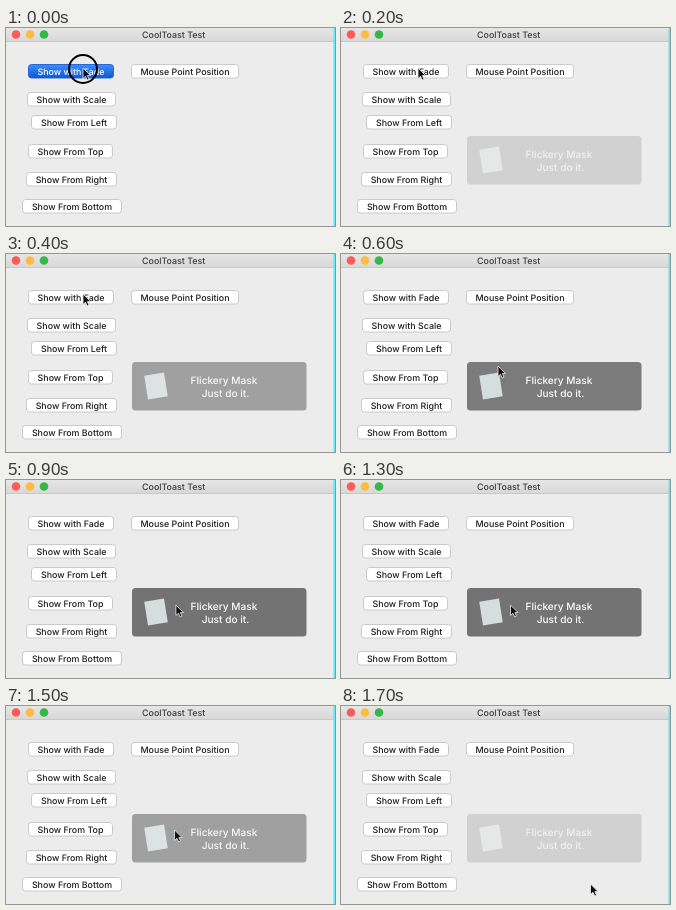
These frames come from a looping animation (329 px wide and 198 px high, 1800 ms). An HTML page:

```html
<!DOCTYPE html>
<html lang="en">
<head>
<meta charset="utf-8">
<title>CoolToast Test</title>
<style>
  html, body { margin: 0; width: 100%; height: 100%; overflow: hidden; background: #ececec; }
  svg { display: block; width: 329px; height: 198px; }
  text { font: 500 8.9px Inter, "Open Sans", sans-serif; text-anchor: middle; text-rendering: geometricPrecision; }
  #toast text { font-size: 10.1px; fill: #fff; }
</style>
</head>
<body>
<svg viewBox="0 0 329 198">
  <defs>
    <linearGradient id="bar" x2="0" y2="1">
      <stop stop-color="#e6e6e6"/><stop offset="1" stop-color="#d8d8d8"/>
    </linearGradient>
    <linearGradient id="blue" x2="0" y2="1">
      <stop stop-color="#3f8df6"/><stop offset="1" stop-color="#0b58dc"/>
    </linearGradient>
  </defs>
  <rect width="329" height="198" fill="#ececec"/>
  <rect width="329" height="13" fill="url(#bar)"/>
  <rect y="13" width="329" height="1" fill="#c8c8c8"/>
  <circle cx="10" cy="6.5" r="4.3" fill="#fc5b57"/>
  <circle cx="24" cy="6.5" r="4.3" fill="#fdbc40"/>
  <circle cx="38" cy="6.5" r="4.3" fill="#34b84a"/>
  <text x="167.7" y="9.9" fill="#3c3c3c">CoolToast Test</text>
  <g id="buttons"></g>
  <rect x="327.5" width="1.5" height="198" fill="#5ce8f4"/>
  <g id="toast">
    <rect x="126" y="108" width="174.5" height="48.5" rx="3.5" fill="#000" fill-opacity=".51"/>
    <rect x="140" y="120" width="20" height="24" fill="#d5dddd" transform="rotate(-9 150 132)"/>
    <text x="218" y="129.8">Flickery Mask</text>
    <text x="219.5" y="143">Just do it.</text>
  </g>
  <circle id="ring" cx="77" cy="41" r="14" fill="none" stroke="#000" stroke-width="2"/>
  <path id="cursor" d="M0 0V10.5L2.5 8.3L4.2 12L6 11.2L4.4 7.6H7.6Z" fill="#111" stroke="#eee" stroke-width=".8"/>
</svg>
<script>
const $ = id => document.getElementById(id);
const LOOP = 1800, STEP = 100;

// label, left, top, width
const buttons = [
  ["Show with Fade", 22, 36, 86],
  ["Mouse Point Position", 125, 36, 108],
  ["Show with Scale", 21, 64, 89],
  ["Show From Left", 25, 87, 86],
  ["Show From Top", 22, 116, 85],
  ["Show From Right", 20, 144, 91],
  ["Show From Bottom", 16, 171, 100],
];
$("buttons").innerHTML = buttons.map(([label, x, y, w]) => `
  <rect x="${x + .5}" y="${y + .5}" width="${w - 1}" height="13.5" rx="3" fill="#fff" stroke="#c6c6c6" stroke-width=".9"/>
  <text x="${x + w / 2}" y="${y + 10.5}" fill="#1c1c1c">${label}</text>`).join("");
const fadeFace = $("buttons").querySelector("rect");
const fadeLabel = $("buttons").querySelector("text");

// [time, value...] keys joined by straight lines
const opacityKeys = [[0, 0], [100, .04], [200, .22], [400, .63], [600, .94], [700, 1],
  [1300, 1], [1500, .63], [1700, .22], [1800, 0]];
const cursorKeys = [[0, 77, 40], [400, 77, 40], [600, 157, 112], [800, 170, 125],
  [1300, 169.5, 125], [1500, 168.5, 124], [1700, 249.5, 178], [1800, 249.5, 178]];

function sample(keys, t) {
  const i = keys.findIndex(key => key[0] > t);
  const a = keys[i - 1], b = keys[i];
  const k = (t - a[0]) / (b[0] - a[0]);
  return a.slice(1).map((v, j) => v + (b[j + 1] - v) * k);
}

function draw() {
  const t = Math.floor(performance.now() % LOOP / STEP) * STEP;
  const pressed = t < 100;
  fadeFace.setAttribute("fill", pressed ? "url(#blue)" : "#fff");
  fadeFace.setAttribute("stroke", pressed ? "#1a60d8" : "#c6c6c6");
  fadeLabel.setAttribute("fill", pressed ? "#fff" : "#1c1c1c");
  $("ring").style.opacity = pressed ? 1 : 0;
  $("toast").style.opacity = sample(opacityKeys, t)[0];
  $("cursor").setAttribute("transform", `translate(${sample(cursorKeys, t)})`);
  requestAnimationFrame(draw);
}
draw();
</script>
</body>
</html>
```
